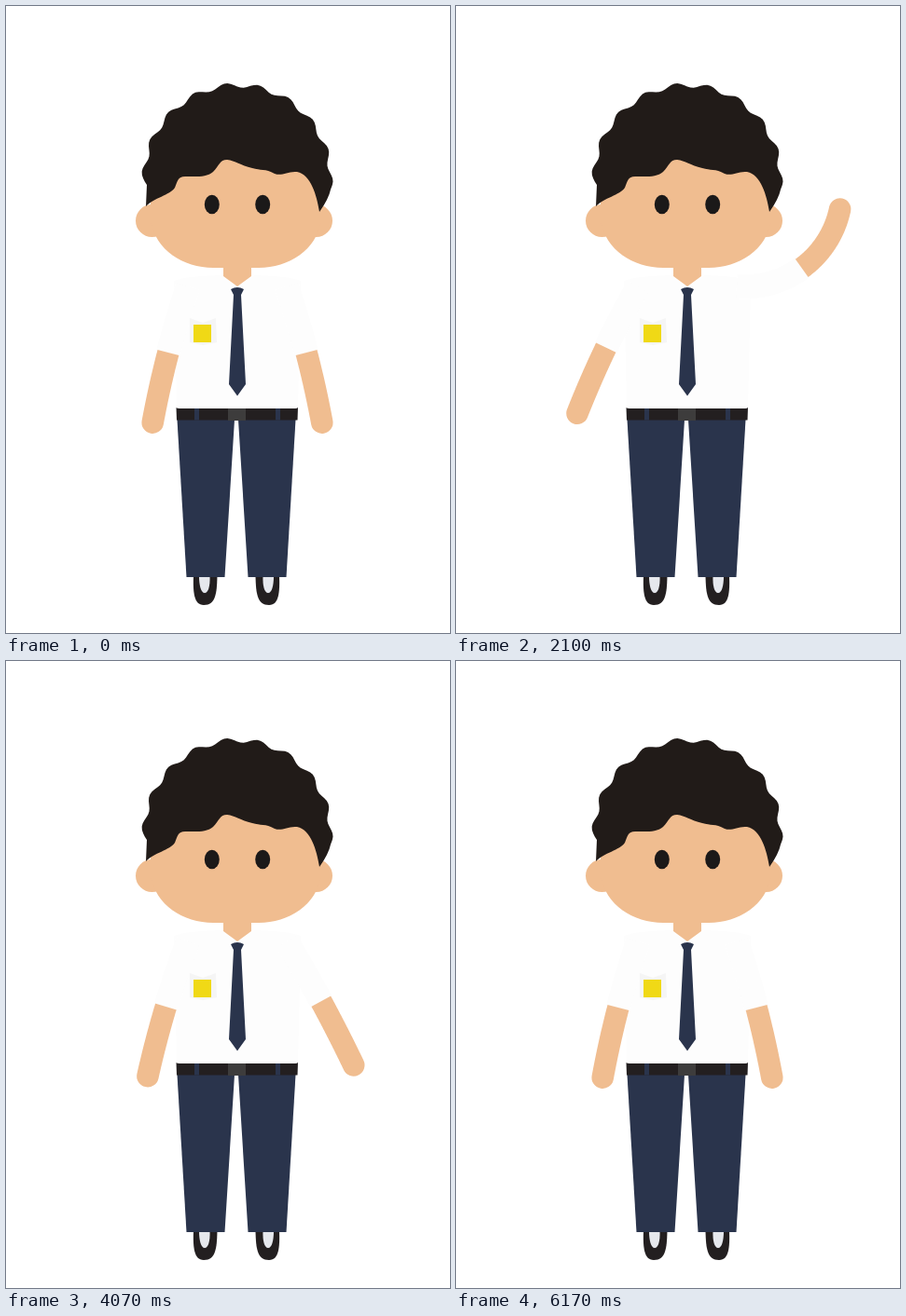
Animation of 476 by 673 pixels, one loop 6.61 s. Source, as an HTML page with a canvas:

```html
<!DOCTYPE html>
<html lang="en">
<head>
<meta charset="utf-8">
<title>Waving student</title>
<style>
html, body { margin: 0; width: 100%; height: 100%; overflow: hidden; background: #fff; }
canvas { display: block; width: 476px; height: 673px; }
</style>
</head>
<body>
<canvas id="stage" width="476" height="673"></canvas>
<script>
const ctx = document.getElementById('stage').getContext('2d');
const SKIN = '#f0bd90', HAIR = '#211b18', NAVY = '#2a344c', SHIRT = '#fdfdfd', BLACK = '#231f20';
const LOOP = 6610, CYCLE = 3300, FPS = 0.03, RAD = Math.PI / 180;

const clamp = (v) => Math.min(1, Math.max(0, v));
const span = (t, from, to) => clamp((t - from) / (to - from));
const mix = (a, b, u) => a + (b - a) * u;
const smooth = (u) => u * u * (3 - 2 * u);

function fill(color, d) {
  ctx.fillStyle = color;
  ctx.fill(new Path2D(d));
}

function ellipse(color, x, y, rx, ry) {
  ctx.fillStyle = color;
  ctx.beginPath();
  ctx.ellipse(x, y, rx, ry, 0, 0, Math.PI * 2);
  ctx.fill();
}

function strokeLine(points, color, width, cap) {
  ctx.beginPath();
  points.forEach(([x, y]) => ctx.lineTo(x, y));
  ctx.strokeStyle = color;
  ctx.lineWidth = width;
  ctx.lineCap = cap;
  ctx.lineJoin = 'round';
  ctx.stroke();
}

// Fringe below, nine evenly spaced curls around the crown
function hairPath() {
  let d = 'M150 215 C158 206 176 203 181 195 C184 188 184 183 192 183 C205 183 215 184 222 178 ' +
    'C229 171 229 165 237 165 C246 166 251 171 264 174 C273 177 278 174 288 180 ' +
    'C296 183 302 177 312 178 C327 181 333 203 336 221 Q346 207 348 197';
  for (let a = -4; a <= 182; a += 2) {
    const r = 1 + 0.026 * Math.cos((a + 2) / 19.8 * 2 * Math.PI);
    d += `L${248 + 100 * r * Math.cos(a * RAD)} ${185 - 100 * r * Math.sin(a * RAD)}`;
  }
  return d + 'L151 192Z';
}
const HAIR_PATH = hairPath();

// An arm is an arc: it leaves the shoulder at `angle` from straight down and turns by `bend`
function arm(side, angle, bend) {
  const steps = 100, part = 151 / steps, sleeve = 49;
  let x = 248 + side * 53, y = 301;
  const points = [[x, y]];
  for (let i = 0; i < steps; i++) {
    const a = (angle + bend * (i + 0.5) / steps) * RAD;
    x += side * Math.sin(a) * part;
    y += Math.cos(a) * part;
    points.push([x, y]);
  }
  strokeLine(points.slice(sleeve), SKIN, 23.6, 'round');
  strokeLine(points.slice(0, sleeve + 1), SHIRT, 26, 'butt');
}

function leg(side) {
  const x = (dx) => 247 + side * dx;
  fill(BLACK, `M${x(20.5)} 612 C${x(21)} 630 ${x(22)} 643 ${x(35)} 643 C${x(46)} 643 ${x(46.5)} 628 ${x(46)} 612Z`);
  fill('#e6e8ed', `M${x(28.5)} 612 C${x(28)} 622 ${x(30)} 630 ${x(34)} 630 C${x(38)} 630 ${x(40)} 622 ${x(40)} 612Z`);
  fill(NAVY, `M${x(2)} 444 H${x(63.5)} L${x(53.5)} 613 H${x(12.5)}Z`);
}

function head(eyeOpen) {
  fill(SKIN, 'M233 270 H263 V290 L248 301 L233 290Z');
  for (const side of [-1, 1]) ellipse(SKIN, 244.5 + side * 88, 230.5, 17.5, 17.5);
  fill(SKIN, 'M155 200 V230 C160 262 190 281 222 281 H271 C303 281 333 262 338 230 V200 L300 150 H190Z');
  fill(HAIR, HAIR_PATH);
  for (const side of [-1, 1]) ellipse('#1b1919', 248 + side * 27.2, 213, 8, 10.3 * eyeOpen);
}

function clothes() {
  leg(-1);
  leg(1);
  fill(SHIRT, 'M229 289 L248 301 L267 289 C290 290 306 291 316 295 L313 432 H183 L180 295 C190 291 208 290 229 289Z');
  fill(BLACK, 'M182.5 431 Q183 432 188 432 H308 Q313 432 313 430.5 L312.5 444.5 H183Z');
  fill(NAVY, 'M202 432 H207 V444.5 H202Z M289 432 H294 V444.5 H289Z');
  fill('#3d3c3c', 'M238 432 H257 V445 H238Z');
  fill(NAVY, 'M241 304 Q248 300 255 304 L252 310 L257 406 L248 418.5 L239 406 L244 310Z');
}

function pocket() {
  fill('#f5f5f5', 'M197 335 L211 340 L225 335 L226 361 L211 364 L197 361Z');
  fill('#f0d916', 'M201 342 H220 V361 H201Z');
}

// Elbow bend: curls up late in the raise, waves twice, then straightens
function elbow(t) {
  const rest = -8, peak = 83, low = 40, first = 1115, last = 2080;
  if (t < first) return mix(rest, peak, span(t, 700, first) ** 2);
  if (t > last) return mix(peak, rest, smooth(span(t, last, 2690)));
  const wave = Math.cos(span(t, first, last) * 4 * Math.PI);
  return mix(low, peak, (1 + wave) / 2);
}

function draw(t) {
  const lift = t < 1700
    ? smooth(span(t, 437, 1170) ** 1.6)
    : 1 - smooth(span(t, 2190, 2870));
  const blink = Math.sin(Math.PI * span(t, 167, 333));
  ctx.clearRect(0, 0, 476, 673);
  clothes();
  arm(-1, 18.5 + 11 * lift, -8);
  arm(1, 18.5 + 67 * lift, elbow(t));
  pocket();
  head(Math.max(0.08, 1 - blink));
}

const start = performance.now();
function tick(now) {
  const t = Math.max(0, now - start) % LOOP % CYCLE;
  draw(Math.floor(t * FPS + 0.2) / FPS);
  requestAnimationFrame(tick);
}
draw(0);
requestAnimationFrame(tick);
</script>
</body>
</html>
```
